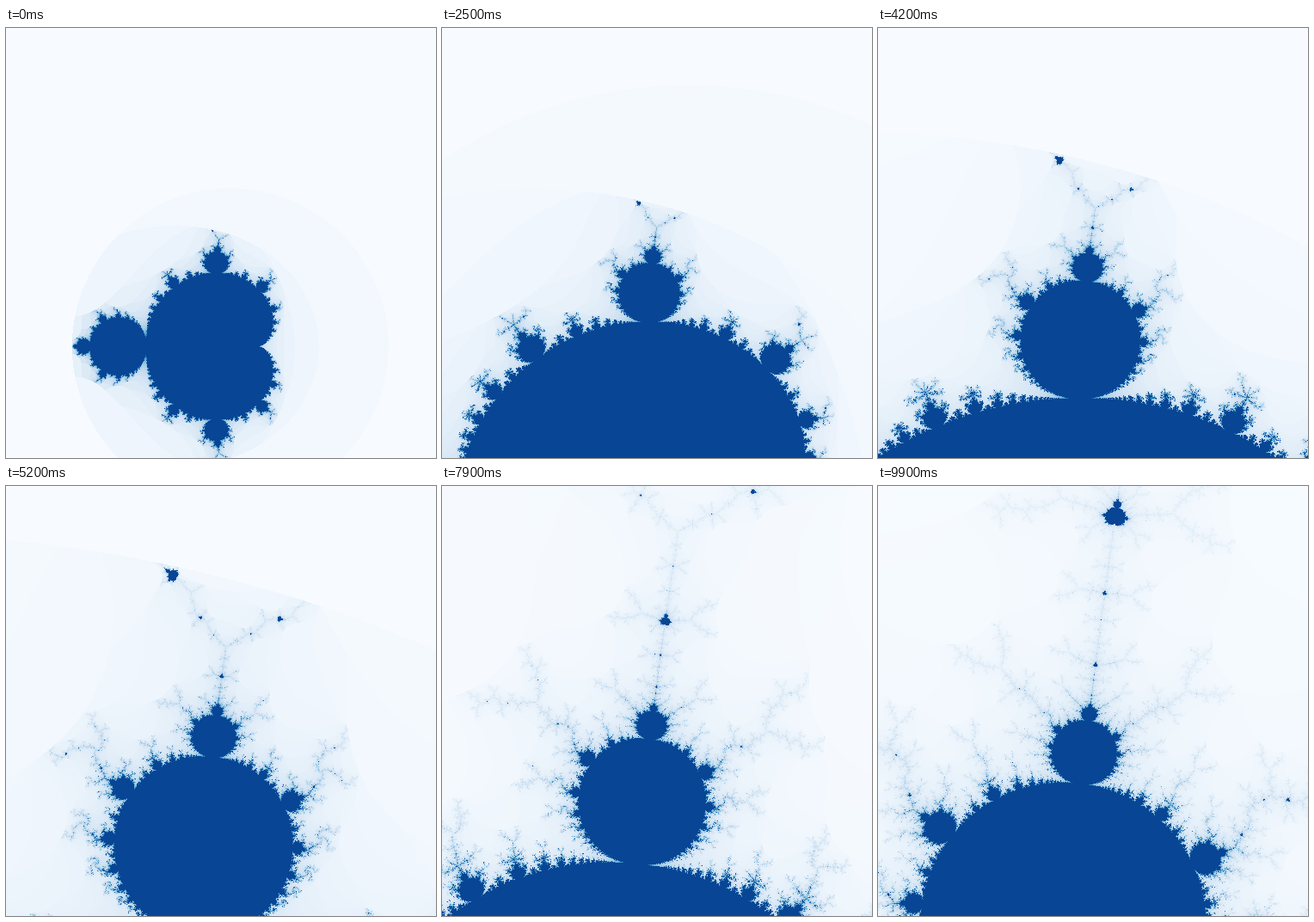
These frames come from a looping animation (500x500 px, 10 s). An HTML page with a canvas:

```html
<!DOCTYPE html>
<html lang="en">
<head>
<meta charset="utf-8">
<title>Mandelbrot zoom</title>
<style>
  html, body { margin: 0; width: 100%; height: 100%; overflow: hidden; background: #f7fbff; }
  canvas { display: block; width: 100vw; height: 100vh; }
</style>
</head>
<body>
<canvas id="view" width="500" height="500"></canvas>
<script>
const SIZE = 500, STEPS = 100, STEP_MS = 100;
const LIMIT = 2;                                  // bound on |z| squared
const SCALE = 130.1, SHRINK = 0.96;               // pixels per unit, window factor per step
const FOCUS = { re: -0.1094, im: 0.8949, x: 246.1, y: 253.3 };
const BLUES = [0xf7fbff, 0xdeebf7, 0xc6dbef, 0x9ecae1, 0x6baed6, 0x4292c6, 0x2171b5, 0x084594];

const ctx = document.getElementById('view').getContext('2d');
const image = ctx.createImageData(SIZE, SIZE);
const pixels = new Uint32Array(image.data.buffer);
const cache = [];

// Deeper views need more iterations
const maxIter = step => Math.round(40 * 1.022 ** step);

// Colour for t in 0..1, packed as ABGR
function shade(t) {
  const pos = t * (BLUES.length - 1);
  const i = Math.min(Math.floor(pos), BLUES.length - 2);
  const mix = shift => {
    const a = BLUES[i] >> shift & 255, b = BLUES[i + 1] >> shift & 255;
    return Math.round(a + (b - a) * (pos - i));
  };
  return (255 << 24 | mix(0) << 16 | mix(8) << 8 | mix(16)) >>> 0;
}

function inMainBody(re, im) {
  const im2 = im * im, q = (re - 0.25) ** 2 + im2;
  return q * (q + re - 0.25) < im2 / 4 || (re + 1) ** 2 + im2 < 1 / 16;
}

function escapeTime(re, im, max) {
  if (inMainBody(re, im)) return max;
  let x = 0, y = 0, oldX = 0, oldY = 0, mark = 8;
  for (let n = 1; n < max; n++) {
    const next = x * x - y * y + re;
    y = 2 * x * y + im;
    x = next;
    if (x * x + y * y > LIMIT) return n;
    // An orbit that returns to the same place never escapes
    if (Math.abs(x - oldX) + Math.abs(y - oldY) < 1e-7) return max;
    if (n === mark) { oldX = x; oldY = y; mark *= 2; }
  }
  return max;
}

function countsAt(step) {
  const counts = new Uint16Array(SIZE * SIZE);
  const unit = SHRINK ** step / SCALE, max = maxIter(step);
  for (let py = 0, i = 0; py < SIZE; py++) {
    const im = FOCUS.im + (FOCUS.y - py) * unit;
    for (let px = 0; px < SIZE; px++) {
      counts[i++] = escapeTime(FOCUS.re + (px - FOCUS.x) * unit, im, max);
    }
  }
  return counts;
}

function draw(step) {
  const counts = cache[step] ||= countsAt(step);
  const max = maxIter(step);
  const low = counts.reduce((a, b) => Math.min(a, b), max);
  const colors = Array.from({ length: max + 1 },
    (_, n) => shade(Math.max(0, n - low) / (max - low)));
  for (let i = 0; i < counts.length; i++) pixels[i] = colors[counts[i]];
  ctx.putImageData(image, 0, 0);
}

let shown = -1;
const start = performance.now();
function tick() {
  const step = Math.floor((performance.now() - start) / STEP_MS) % STEPS;
  if (step !== shown) draw(shown = step);
  requestAnimationFrame(tick);
}
tick();
</script>
</body>
</html>
```
